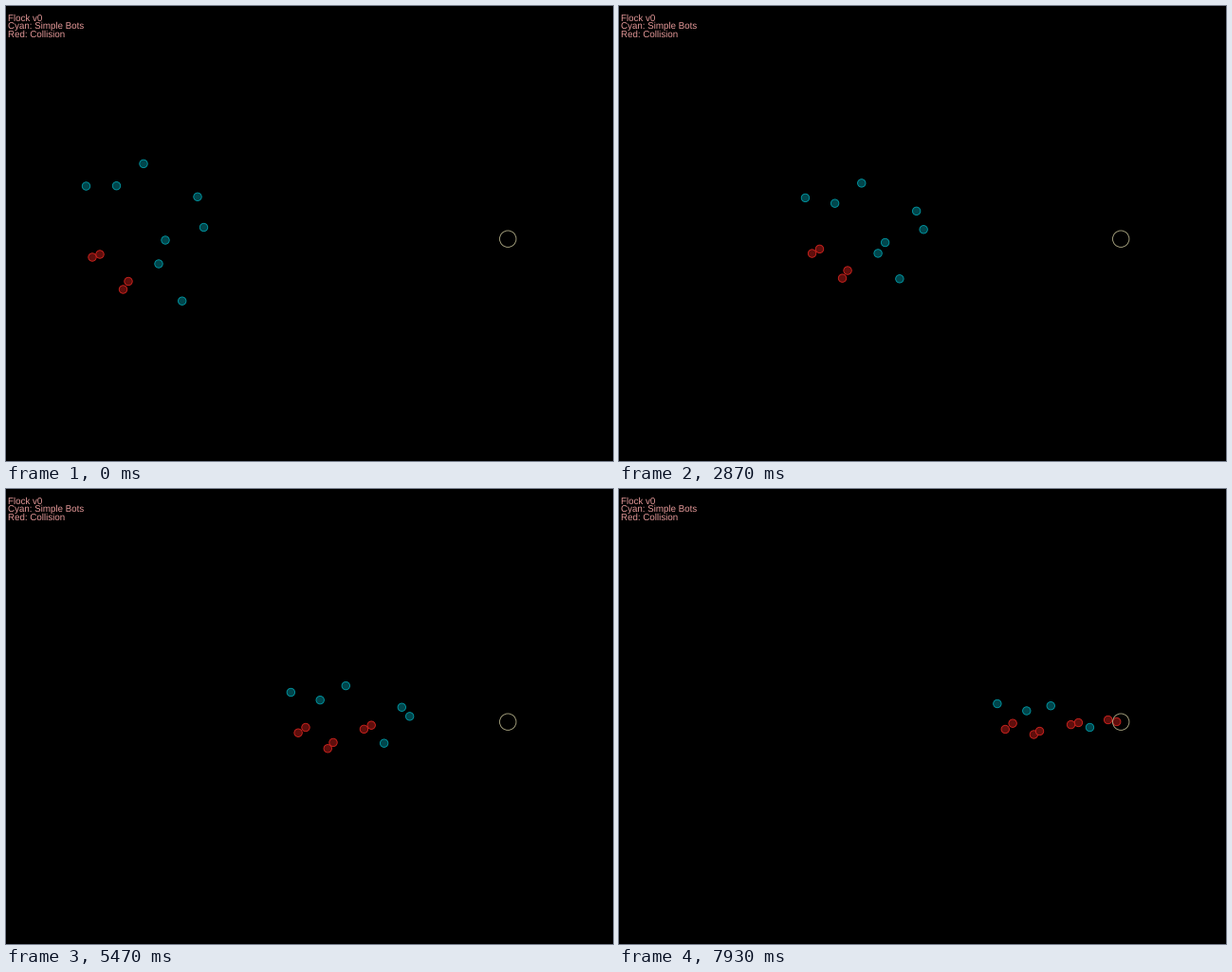
Animation, 640 px wide and 480 px high, one loop 8 s. Source, as a matplotlib script:

```python
import numpy as np
import matplotlib.pyplot as plt
from matplotlib.animation import FuncAnimation
from matplotlib.patches import Circle

W, H, DPI = 640, 480, 100
LOOP_MS, TICK_MS = 8000, 20
STEPS = 119            # moves in one loop, 15 per second
SPEED = 2.682          # pixels per move along the path
TOUCH = 12             # centre distance that counts as a collision
RADIUS = 4.2
PX = 72 / DPI          # one pixel in points

CYAN = ("#0096a2", "#00464c")
RED = ("#cd231e", "#5f0e0c")

# Start x, then the height at the start, halfway and at the end
BOTS = np.array([
    (84.5, 190, 207.6, 226.5),
    (116.5, 189.7, 214.8, 234),
    (145, 166.4, 195.7, 228.7),
    (202, 201.3, 222.4, 243.5),
    (208.5, 233.5, 237.3, 245.5),
    (168, 247, 249.7, 246.5),
    (161, 272, 257.3, 248.6),
    (185.7, 311.2, 279, 251.5),
    (91, 265, 259.4, 253.5),
    (99, 262, 254.2, 247.2),
    (123.5, 299, 281.6, 259),
    (129, 290.5, 274.1, 255.5),
])


def flight(x0, start, middle, end):
    """Parabolic arcs flown at constant speed, as (step, bot, xy)."""
    s = np.linspace(0, 1, STEPS)[:, None]
    bow = middle - (start + end) / 2
    y = start + (end - start) * s + 4 * bow * s * (1 - s)
    dx = np.sqrt(SPEED ** 2 - np.diff(y, axis=0) ** 2)
    x = x0 + np.vstack((np.zeros_like(x0), np.cumsum(dx, axis=0)))
    return np.stack((x, y), axis=2)


paths = flight(*BOTS.T)

plt.rcParams["text.hinting"] = "none"
fig = plt.figure(figsize=(W / DPI, H / DPI), dpi=DPI, facecolor="black")
ax = fig.add_axes([0, 0, 1, 1])
ax.set_xlim(0, W)
ax.set_ylim(H, 0)
ax.axis("off")

for row, label in enumerate(["Flock v0", "Cyan: Simple Bots", "Red: Collision"]):
    ax.text(2.3, 15.5 + 8.5 * row, label, color="#e59999", va="baseline",
            family="Liberation Sans", size=9.8 * PX)

bots = [ax.add_patch(Circle((0, 0), RADIUS, lw=0.9 * PX, zorder=2)) for _ in BOTS]
ax.add_patch(Circle((529.2, 245.7), 8.7, fill=False, ec="#a8a480",
                    lw=0.9 * PX, zorder=3))


def update(tick):
    step = (3 * tick + 2) // 10          # 15 moves per second
    pos = paths[max(step - 1, 0)]        # the flock rests for one move first
    gaps = np.linalg.norm(pos[:, None] - pos, axis=2)
    np.fill_diagonal(gaps, np.inf)
    for bot, center, gap in zip(bots, pos, gaps.min(axis=1)):
        edge, face = RED if gap < TOUCH else CYAN
        bot.center = center
        bot.set(edgecolor=edge, facecolor=face)
    return bots


anim = FuncAnimation(fig, update, frames=LOOP_MS // TICK_MS, interval=TICK_MS,
                     repeat=True, repeat_delay=0)
plt.show()
```
